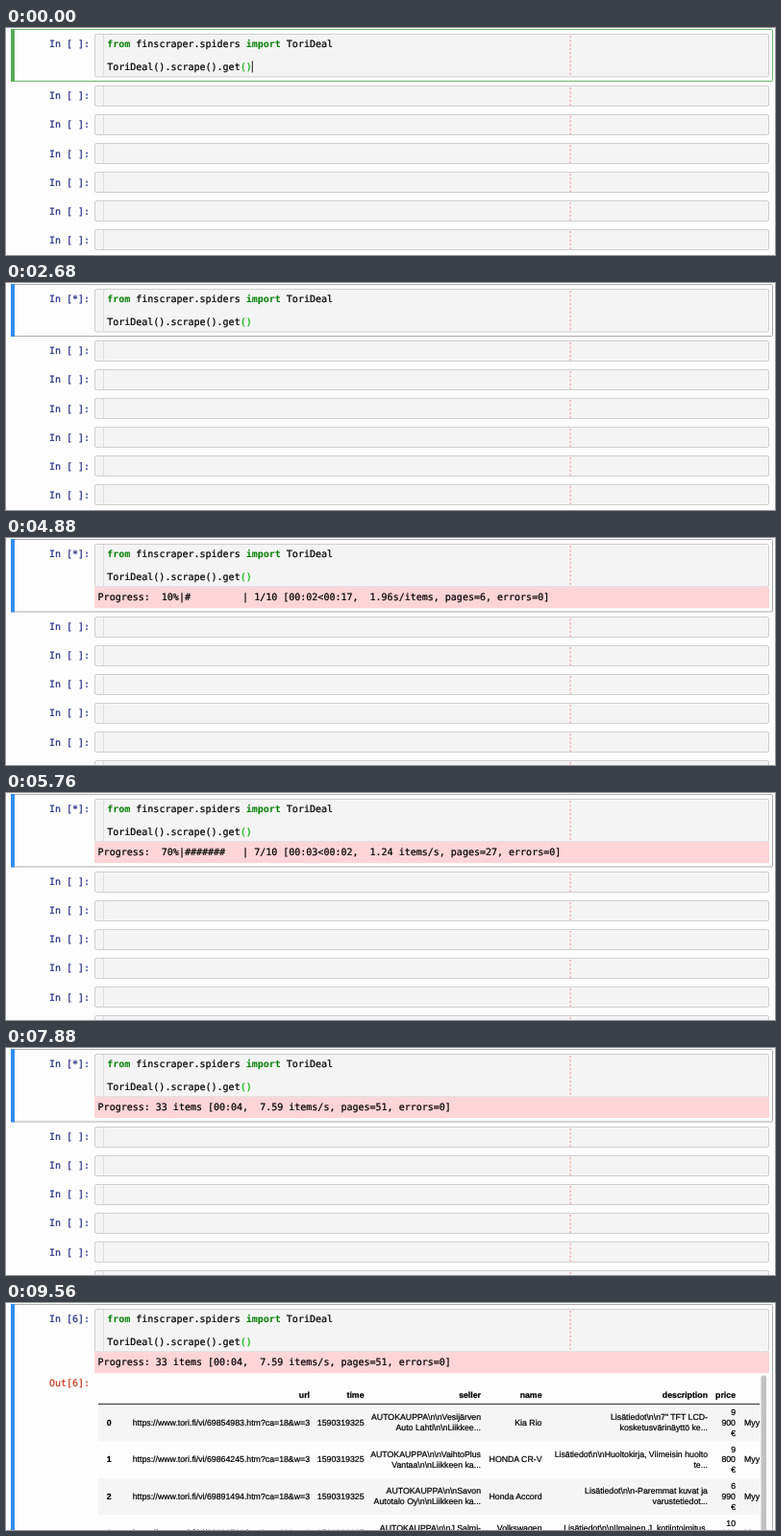
Recreate the animation shown at these times as an HTML page. Size 800x237 px, loop 9720 ms.

```html
<!DOCTYPE html>
<html lang="fi">
<meta charset="utf-8">
<title>Notebook</title>
<style>
html, body { margin: 0; width: 100%; height: 100%; overflow: hidden; background: #fefdfe }
svg { display: block }
text {
  white-space: pre; font: 10px "DejaVu Sans Mono", monospace; text-rendering: geometricPrecision;
  fill: currentColor; stroke: currentColor; stroke-width: .22px;
}
.table text { font: 8.76px "Liberation Sans", Arial, sans-serif; text-anchor: end }
.table .bold { font-weight: bold }
.table .start { text-anchor: start }
.kw { fill: #008000; stroke: none; font-weight: bold }
.br { fill: #00b400; stroke: #00b400 }
</style>
<svg id="stage" width="800" height="237" viewBox="0 0 800 237"></svg>
<script>
const LOOP = 9720, RUN = 80, BAR = 2760, DONE = 8600;
const stage = document.getElementById('stage');

// [time, items, elapsed, left, rate, pages]
const updates = [
  [4720, 1, 2, 17, '1.96s/items', 6],
  [5000, 3, 2, 9, '1.42s/items', 12],
  [5400, 5, 2, 5, '1.05s/items', 20],
  [5680, 7, 3, 2, '1.24 items/s', 27],
  [6080, 11, 3, 0, '1.69 items/s', 35],
  [6400, 14, 3, 0, '2.33 items/s', 43],
  [6840, 20, 4, 0, '3.16 items/s', 46],
  [6960, 25, 4, 0, '4.27 items/s', 48],
  [7080, 29, 4, 0, '5.71 items/s', 50],
  [7200, 33, 4, 0, '7.59 items/s', 51]
];

const rows = [
  ['69854983', ['AUTOKAUPPA~Vesijärven', 'Auto Lahti~Liikkee...'], 'Kia Rio',
    ['Lisätiedot~7" TFT LCD-', 'kosketusvärinäyttö ke...'], ['9', '900', '€']],
  ['69864245', ['AUTOKAUPPA~VaihtoPlus', 'Vantaa~Liikkeen ka...'], 'HONDA CR-V',
    ['Lisätiedot~Huoltokirja, Viimeisin huolto', 'te...'], ['9', '800', '€']],
  ['69891494', ['AUTOKAUPPA~Savon', 'Autotalo Oy~Liikkeen ka...'], 'Honda Accord',
    ['Lisätiedot~-Paremmat kuvat ja', 'varustetiedot...'], ['6', '990', '€']],
  ['69902718', ['AUTOKAUPPA~J.Salmi-', 'Koski Oy~Liikkeen...'], ['Volkswagen', 'Golf'],
    ['Lisätiedot~Ilmainen J. kotiintoimitus.', 'Rahoitus...'], ['10', '900', '€']]
];

const escape = s => s.replace(/&/g, '&amp;').replace(/</g, '&lt;').replace(/~/g, '\\n\\n');
const text = (x, y, s, color = '#000', cls = '') =>
  `<text x="${x}" y="${y}" color="${color}" class="${cls}">${escape(s)}</text>`;
const rect = (x, y, w, h, fill, extra = '') =>
  `<rect x="${x}" y="${y}" width="${w}" height="${h}" fill="${fill}" ${extra}/>`;
const prompt = (y, label, color = '#242f85') => text(44.9, y, label, color);

function inputBox(y, h) {
  return rect(92.5, y + .5, 701, h - 1, '#f5f4f5', 'stroke="#cfcfcf" rx="1.5"') +
    `<path d="M101.5 ${y + 1}v${h - 2}" stroke="#dedede"/>` +
    `<path d="M587.1 ${y + 2}v${h - 3}" stroke="#f0948c" stroke-dasharray="2.2 2.1"/>`;
}

function progress(t) {
  const last = updates.filter(u => t >= u[0]).pop();
  if (!last) return 'Progress:   0%|          | 0/10 [00:00<?, ? items/s]';
  const [, n, elapsed, left, rate, pages] = last;
  const clock = s => '00:' + String(s).padStart(2, '0');
  const tail = `,  ${rate}, pages=${pages}, errors=0]`;
  return n > 10
    ? `Progress: ${n} items [${clock(elapsed)}${tail}`
    : `Progress:  ${n}0%|${'#'.repeat(n).padEnd(10)}| ${n}/10 [${clock(elapsed)}<${clock(left)}${tail}`;
}

function cell(x, middle, value) {
  const lines = [].concat(value);
  return lines.map((s, i) => text(x, middle + 3 + (i - (lines.length - 1) / 2) * 10.7, s)).join('');
}

function table() {
  const heads = [[316, 'url'], [372.5, 'time'], [494, 'seller'], [557.5, 'name'], [730, 'description'], [759, 'price']];
  let out = heads.map(([x, s]) => text(x, 98.5, s, '#000', 'bold')).join('');
  rows.forEach(([id, seller, name, info, price], i) => {
    const mid = 124.8 + i * 38.5;
    if (i % 2 == 0) out += rect(96, mid - 19, 688, 38.5, '#f5f5f5');
    out += text(109.5, mid + 3, String(i), '#000', 'bold') +
      cell(316, mid, `https://www.tori.fi/vi/${id}.htm?ca=18&w=3`) +
      cell(372.5, mid, '1590319325') + cell(494, mid, seller) + cell(557.5, mid, name) +
      cell(730, mid, info) + cell(759, mid, price) + text(768, mid + 3, 'Myyd', '#000', 'start');
  });
  out += rect(96, 105, 688, 1, '#333');
  return '<clipPath id="view"><path d="M92 75H784V237H92z"/></clipPath>' +
    `<g class="table" clip-path="url(#view)">${out}</g>` +
    rect(784, 75, 9, 162, '#fafafa') + rect(785.5, 75.5, 5.5, 170, '#c1c1c1', 'rx="2.7"');
}

function picture(t) {
  const running = t >= RUN, bar = t >= BAR, done = t >= DONE;
  const height = done ? 260 : bar ? 76 : 54.5;
  const label = done ? 'In [6]:' : running ? 'In [*]:' : 'In [ ]:';
  let out = rect(5.5, 1.5, 792, height - .5, '#fefdfe', `stroke="${running ? '#ababab' : '#66b56a'}" rx="1"`) +
    rect(5, 1, 4, height + .5, running ? '#338df0' : '#57ab57') +
    prompt(19.6, label) + inputBox(6, 45.5) +
    `<text x="105.2" y="19.6"><tspan class="kw">from</tspan> finscraper.spiders <tspan class="kw">import</tspan> ToriDeal</text>` +
    `<text x="105.2" y="44">ToriDeal().scrape().get<tspan class="br">()</tspan></text>`;
  if (!running) out += rect(255.8, 34.5, .9, 12, '#000');
  if (bar) out += rect(92, 51.3, 702, 21.9, '#ffd5d7') + text(95.6, 65.4, progress(t));
  if (done) return out + prompt(86.6, 'Out[6]:', '#c83a1c') + table();
  for (let y = bar ? 81.8 : 60; y < 237; y += 30.1)
    out += prompt(y + 14.3, 'In [ ]:') + inputBox(Math.round(y), 22);
  return out;
}

let shown = '';
function frame() {
  const next = picture(performance.now() % LOOP);
  if (next !== shown) stage.innerHTML = shown = next;
  requestAnimationFrame(frame);
}
frame();
</script>
</html>
```
